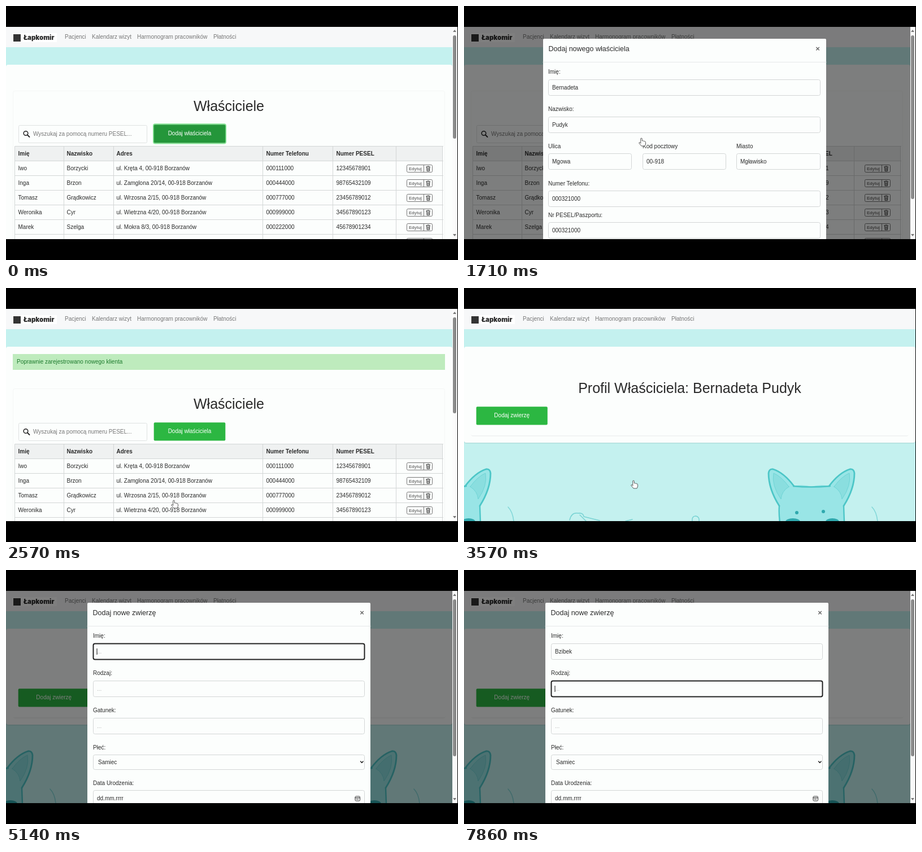
Animation, 800 px wide and 450 px high, one loop 8 s. Source, as an HTML page:

```html
<!DOCTYPE html>
<html lang="pl">
<head>
<meta charset="utf-8">
<title>Panel</title>
<style>
html, body { margin: 0; width: 100%; height: 100%; overflow: hidden; background: #000; }
svg { display: block; width: 800px; height: 450px; }
text { font: 10px "Liberation Sans", Arial, sans-serif; fill: #2a2a2a; white-space: pre; }
.b { font-weight: 700; }
.nav { fill: #777; }
.logo { font: 900 11.5px Inter, sans-serif; fill: #2b2b2b; }
.h1 { font-size: 25px; }
.h2 { font-size: 12.5px; }
.mid { text-anchor: middle; }
.white { fill: #fff; }
.hint { fill: #777; }
.dots { fill: #b4b4b4; }
.small { font-size: 7.5px; font-weight: 700; fill: #777; }
.ok { fill: #1c7a2c; }
.x { font: 700 13px "Liberation Sans", Arial, sans-serif; fill: #666; }
</style>
</head>
<body>
<svg id="stage" viewBox="0 0 800 450"></svg>
<script>
const stage = document.getElementById('stage');
const STEP = 1000 / 7, STEPS = 56;
const WHITE = '#fcfefd', GREEN = '#2cb742', DARK_GREEN = '#24963a', TEAL = '#4cc6c7';

const people = [
  ['Iwo', 'Borzycki', 'ul. Kręta 4, 00-918 Borzanów', '000111000', '12345678901'],
  ['Inga', 'Brzon', 'ul. Zamglona 20/14, 00-918 Borzanów', '000444000', '98765432109'],
  ['Tomasz', 'Grądkowicz', 'ul. Wrzosna 2/15, 00-918 Borzanów', '000777000', '23456789012'],
  ['Weronika', 'Cyr', 'ul. Wietrzna 4/20, 00-918 Borzanów', '000999000', '34567890123'],
  ['Marek', 'Szelga', 'ul. Mokra 8/3, 00-918 Borzanów', '000222000', '45678901234']
];
const owner = ['Bernadeta', 'Pudyk', 'ul. Mgowa, 00-918 Mgławisko', '000321000', '000321000'];
const pet = 'Bzibek';

const clamp = v => Math.max(0, Math.min(1, v));
const ramp = (k, a, b) => { const u = clamp((k - a) / (b - a)); return u * u * (3 - 2 * u); };
const text = (x, y, s, cls = '') => `<text x="${x}" y="${y}" class="${cls}">${s}</text>`;
const rect = (x, y, w, h, fill, more = '') =>
  `<rect x="${x}" y="${y}" width="${w}" height="${h}" fill="${fill}" ${more}/>`;
const path = (d, stroke, width = 1, fill = 'none') =>
  `<path d="${d}" fill="${fill}" stroke="${stroke}" stroke-width="${width}" stroke-linejoin="round" stroke-linecap="round"/>`;
const group = (s, x, y, flip = '') => `<g transform="translate(${x} ${y}) ${flip}">${s}</g>`;

const button = (x, y, w, label, fill) =>
  rect(x - .3, y + .2, w + .6, 32.4, fill, 'rx="2"') + text(x + w / 2, y + 19.3, label, 'mid white');

function wallpaper() {
  const ear = 'M646 351Q664 327 683 321Q690 320 691 328Q691 356 672 386';
  const inner = 'M655 352Q668 334 682 328Q686 350 669 374Q668 360 655 352Z';
  const half = path('M614 352Q632 347 646 351Q664 327 683 321Q690 320 691 328Q691 356 672 386L673 420H614Z', 'none', 0, '#99e5e6') +
    path(inner, '#6fd5d6', 1, '#8adedf') + path(ear, TEAL, 2.8);
  const dog = half + group(half, 1230, 0, 'scale(-1 1)') +
    path('M583 351Q612 354 648 351M558 386Q557 400 559 414M672 386L673 414', TEAL, 2.4) +
    '<g fill="#2fa9ae"><circle cx="589" cy="398" r="3"/><circle cx="636" cy="396" r="3"/>' +
    '<ellipse cx="582" cy="414" rx="13" ry="6"/><ellipse cx="652" cy="414" rx="12" ry="6"/></g>';
  const edge = path('M78 388Q86 396 88 413', '#7fd6d7', 1.5);
  return rect(0, 37, 800, 376, '#c4f1ef') + dog + group(dog, -644, 0) + edge + group(edge, 644, 0) +
    path('M187 411Q190 397 202 399Q211 398 212 405L240 412M205 402L216 413M404 413Q403 404 410 404Q417 405 416 413M286 413L298 410', '#79d3d3', 1.5);
}

function navbar(w) {
  return rect(0, 37, w, 36, '#f7f8f9') + rect(11, 48, 79, 16, '#fff') +
    rect(13, 50, 13, 13, '#333') + text(31, 60, 'Łapkomir', 'logo') +
    [[104, 'Pacjenci'], [152, 'Kalendarz wizyt'], [232, 'Harmonogram pracowników'], [367, 'Płatności']]
      .map(([x, s]) => text(x, 58.2, s, 'nav')).join('');
}

function tableRow(y, cells, head) {
  const xs = [22, 108, 196, 461, 585];
  let s = cells.map((c, i) => text(xs[i] - .5, y + 16, c, head ? 'b' : '')).join('');
  if (!head) s += rect(709.5, y + 6.5, 45, 13, WHITE, 'rx="2" stroke="#777"') +
    path(`M739.5 ${y + 7}v12`, '#777') + text(713, y + 15.7, 'Edytuj', 'small') +
    path(`M743.5 ${y + 10}h7M746 ${y + 9}h2.5M744.5 ${y + 10}l.5 7.5h4.5l.5 -7.5M746.3 ${y + 12}v4M748.3 ${y + 12}v4`, '#444');
  return s;
}

function ownersPage(alert) {
  const d = alert ? 28 : 0, n = alert ? 17 : 16, top = 249 + d, end = top + 26 * (n + 1);
  let s = rect(0, 37, 790, 900, '#c4f1ef') + navbar(790) +
    rect(0, 104, 790, end - 80, WHITE, 'rx="4"') +
    rect(12.5, 150.5 + d, 764, end - 138 - d, 'none', 'rx="3" stroke="#f5f7f6"');
  if (alert) s += rect(12, 117, 765, 28, '#beebbd') + text(19, 134, 'Poprawnie zarejestrowano nowego klienta', 'ok');
  s += text(394.5, 186 + d, 'Właściciele', 'h1 mid') +
    rect(22.5, 211.5 + d, 227, 31, WHITE, 'rx="2" stroke="#dfe2e2"') +
    `<circle cx="35" cy="${225.5 + d}" r="3.8" fill="none" stroke="#222" stroke-width="1.5"/>` +
    path(`M38 ${228.5 + d}l3.5 3.5`, '#222', 1.8) +
    text(48, 229.7 + d, 'Wyszukaj za pomocą numeru PESEL...', 'hint');
  if (!alert) s += rect(261, 209.2, 128, 34.4, 'none', 'rx="3" stroke="#85e394" stroke-width="2"');
  s += button(262, 210 + d, 126, 'Dodaj właściciela', alert ? GREEN : DARK_GREEN);
  s += rect(16, top, 757, 26, '#eff1f1') +
    tableRow(top, ['Imię', 'Nazwisko', 'Adres', 'Numer Telefonu', 'Numer PESEL'], true);
  let lines = '';
  for (let i = 0; i <= n + 1; i++) lines += `M16 ${top + 26 * i - .5}H773.5`;
  for (const x of [16, 103, 191, 455, 579, 691, 773]) lines += `M${x - .5} ${top}V${end}`;
  s += path(lines, '#d3d6d6');
  for (let i = 0; i < n; i++) s += tableRow(top + 26 * (i + 1), i < 16 ? people[i % 5] : owner);
  return s;
}

function profilePage(w, hover) {
  return wallpaper() + navbar(w) +
    rect(0, 105, w, 170.5, '#b3dedd', 'rx="4"') + rect(0, 104, w, 170, WHITE, 'rx="4"') +
    rect(12.5, 151.5, w - 25, 111, '#e9eceb', 'rx="3"') + rect(12, 149, w - 24, 112.5, WHITE, 'rx="3"') +
    text(w / 2, 186, `Profil Właściciela: ${owner[0]} ${owner[1]}`, 'h1 mid') +
    button(22, 210, 125.5, 'Dodaj zwierzę', hover ? DARK_GREEN : GREEN);
}

function scrollbar(y, h) {
  return rect(790, 37, 9, 376, '#fbfbfb') + rect(791, y, 6, h, '#8b8b8b', 'rx="3"') +
    '<path d="M791 46h6l-3 -4zM791 404h6l-3 4z" fill="#777"/>';
}

const field = (x, y, w, s, cls, focus) =>
  rect(x + .5, y + .5, w - 1, 28, WHITE, focus ? 'rx="3" stroke="#222" stroke-width="2"' : 'rx="3" stroke="#d3d6d6"') +
  text(x + 7, y + 17.8, s, cls);

const modalBox = (x, title, h) => rect(x, 58, 501, h, WHITE, 'rx="2"') +
  text(x + 9.5, 80, title, 'h2') + text(x + 486, 80, '×', 'x mid') + path(`M${x} 99.5h501`, '#e6e9e9');

function ownerModal() {
  const rows = [
    [149, 120, 'Imię:', owner[0], 482], [149, 186, 'Nazwisko:', owner[1], 482],
    [149, 251.5, 'Ulica', 'Mgowa', 148], [316, 251.5, 'Kod pocztowy', '00-918', 148], [482, 251.5, 'Miasto', 'Mgławisko', 149],
    [149, 317.5, 'Numer Telefonu:', owner[3], 482], [149, 373.5, 'Nr PESEL/Paszportu:', owner[4], 482]
  ];
  return modalBox(140, 'Dodaj nowego właściciela', 413) +
    rows.map(([x, y, label, s, w]) => text(x, y, label) + field(x, Math.round(y + 9.6), w, s)).join('') +
    button(149, 427, 482, 'Dodaj właściciela', GREEN);
}

function petModal(k) {
  const focus = k >= 48 ? 1 : k >= 34 ? 0 : -1;
  const name = pet.slice(0, Math.max(0, k - 39));
  const typing = k >= 40 && k < 47;
  const blink = Math.floor((k - (focus ? 47.5 : 34)) / 3.7) % 2 === 0;
  let s = modalBox(144, 'Dodaj nowe zwierzę', 434);
  ['Imię:', 'Rodzaj:', 'Gatunek:'].forEach((label, i) => {
    const y = [130, 196, 262][i], value = i ? '' : name;
    s += text(154, y - 10, label) + field(154, y, 481, value || '...', value ? '' : 'dots', focus === i);
  });
  if (focus >= 0 && (typing || blink)) {
    const x = focus || !name ? 161 : 161 + name.length * 5.2;
    s += rect(x - .5, focus ? 205 : 139, 1, 11, '#111');
  }
  return s + text(154, 317.5, 'Płeć:') + rect(154.5, 327.5, 480, 26, WHITE, 'rx="3" stroke="#d3d6d6"') +
    text(163, 344, 'Samiec') + path('M627.5 339l2.3 2.5l2.3 -2.5', '#222', 1.5) +
    text(154, 380.5, 'Data Urodzenia:') + field(154, 390, 481, 'dd.mm.rrrr') +
    rect(618, 401, 8.5, 8, 'none', 'rx="1.5" stroke="#333"') + path('M618 403.5h8M620 406h4', '#333');
}

const arrow = path('M0 0V10.5L2.5 8.2L4.2 12L6 11.2L4.4 7.6H7.8Z', '#333', .8, '#fff');
const hand = path('M-1.3 7V.8Q0 -.8 1.2 .8V5Q2.6 4 3.6 5.4Q5 4.6 5.8 6Q7.4 5.6 7.5 7.5V10Q7.2 12 6 14H0L-4.2 9Q-4.2 7 -2.6 7.8L-1.3 9Z', '#333', .8, '#fff');

function cursor(k) {
  const stops = [[7, 300, 300], [10, 314, 234], [14, 314, 234], [16, 297, 376], [19, 297, 376],
    [22, 300, 341], [25, 300, 341], [29, 97, 230], [32, 97, 230], [34, 250, 144]];
  if (k < 7 || k >= 35) return '';
  let i = 0;
  while (i < stops.length - 2 && k >= stops[i + 1][0]) i++;
  const [a, x, y] = stops[i], [b, X, Y] = stops[i + 1], u = ramp(k, a, b);
  return group(k < 11 ? arrow : hand, x + (X - x) * u, y + (Y - y) * u);
}

const overlay = (modal, alpha, dy) => `<g opacity="${alpha}">` +
  rect(0, 37, 790, 376, '#000', 'opacity=".5"') + group(modal, 0, dy) + '</g>';

function scene(k) {
  let s;
  if (k < 17) {
    s = ownersPage(false);
    if (k < 11) s += scrollbar(52, 183);
    else {
      const u = ramp(k, 12, 15);
      s += overlay(ownerModal(), k < 12 ? .5 : 1, -79 * u) + scrollbar(52 + 59 * u, 290);
    }
  } else if (k < 24) {
    const u = ramp(k, 18, 22);
    s = group(ownersPage(true), 0, -390 * u) + scrollbar(52 + 178 * u, 170);
  } else if (k < 31) {
    s = profilePage(799, k >= 29);
  } else {
    s = profilePage(790, false) + overlay(petModal(k), k < 32 ? .5 : 1, 0) + scrollbar(52, 278);
  }
  return '<clipPath id="view"><rect y="37" width="799" height="376"/></clipPath>' +
    `<g clip-path="url(#view)">${s}${cursor(k)}</g>`;
}

let shown = -1;
const start = performance.now();
function draw() {
  const t = (performance.now() - start) % 8000;
  const k = Math.min(STEPS - 1, Math.floor((t + 5) / STEP));
  if (k !== shown) stage.innerHTML = scene(shown = k);
  requestAnimationFrame(draw);
}
draw();
</script>
</body>
</html>
```
